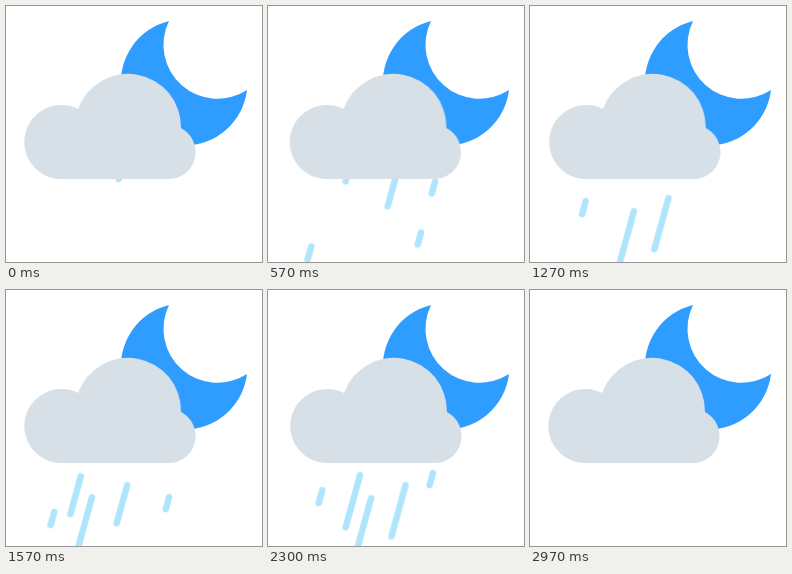
An HTML page for the animation above (3.01 s loop, 256 px wide and 256 px high).

```html
<!DOCTYPE html>
<html lang="en">
<head>
<meta charset="utf-8">
<title>Rainy night</title>
<style>
  html, body { margin: 0; width: 100%; height: 100%; overflow: hidden; background: #fff; }
  svg { display: block; width: 100%; height: 100%; }
  .cloud { fill: #d7dfe7; animation: sway 1505ms cubic-bezier(.37, 0, .63, 1) infinite; }
  .rain { stroke: #aee5fd; stroke-width: 6.5; stroke-linecap: round; }
  .rain line { animation: fall 3010ms linear infinite; }
  @keyframes sway {
    50% { transform: translateX(4px); }
  }
  @keyframes fall {
    from { transform: translate(var(--x0), var(--y0)); }
    to { transform: translate(var(--x1), var(--y1)); }
  }
</style>
</head>
<body>
<svg viewBox="0 0 256 256">
  <clipPath id="below"><rect y="155" width="256" height="101"/></clipPath>
  <path fill="#2f9dff" d="M163 15A63.3 63.3 0 1 0 241 84A54 54 0 0 1 163 15Z"/>
  <g clip-path="url(#below)"><g class="rain"></g></g>
  <path class="cloud" d="M55 173A37 37 0 1 1 72 103A53 53 0 0 1 174.9 122A27 27 0 0 1 162 173Z"/>
</svg>
<script>
  const LOOP = 3010, SLANT = -0.275;
  const FAST = 0.3, SLOW = 0.18, DRIFT = 0.09; // px per ms

  // Each lane: x at y = 200, streak length, then passes of [time, top y, speed]
  const lanes = [
    [54.3, 13, [[330, 197, SLOW], [1270, 195, DRIFT], [2300, 200, SLOW]]],
    [71, 38, [[830, 215, FAST], [1570, 186, FAST], [2800, 215, FAST]]],
    [87.9, 52, [[330, 192, FAST], [1570, 207, FAST], [2300, 185, FAST]]],
    [105.3, 52, [[330, 215, FAST], [1270, 205, FAST], [2300, 208, FAST]]],
    [119.8, 38, [[830, 240, FAST], [1570, 195, FAST], [2800, 240, FAST]]],
    [136.2, 51, [[330, 208, FAST], [1270, 192, FAST], [2300, 195, FAST]]],
    [160.3, 12, [[330, 183, SLOW], [830, 222, SLOW], [2300, 183, SLOW]]],
    [165, 12, [[1570, 207, SLOW]]]
  ];

  const rain = document.querySelector('.rain');

  function addDrop(x, length, [time, top, speed]) {
    const drop = document.createElementNS('http://www.w3.org/2000/svg', 'line');
    drop.setAttribute('x2', SLANT * length);
    drop.setAttribute('y2', length);
    const start = top - speed * time;
    [start, start + speed * LOOP].forEach((y, i) => {
      drop.style.setProperty('--x' + i, x + SLANT * (y - 200) + 'px');
      drop.style.setProperty('--y' + i, y + 'px');
    });
    rain.append(drop);
  }

  for (const [x, length, passes] of lanes) {
    for (const pass of passes) addDrop(x, length, pass);
  }
</script>
</body>
</html>
```
